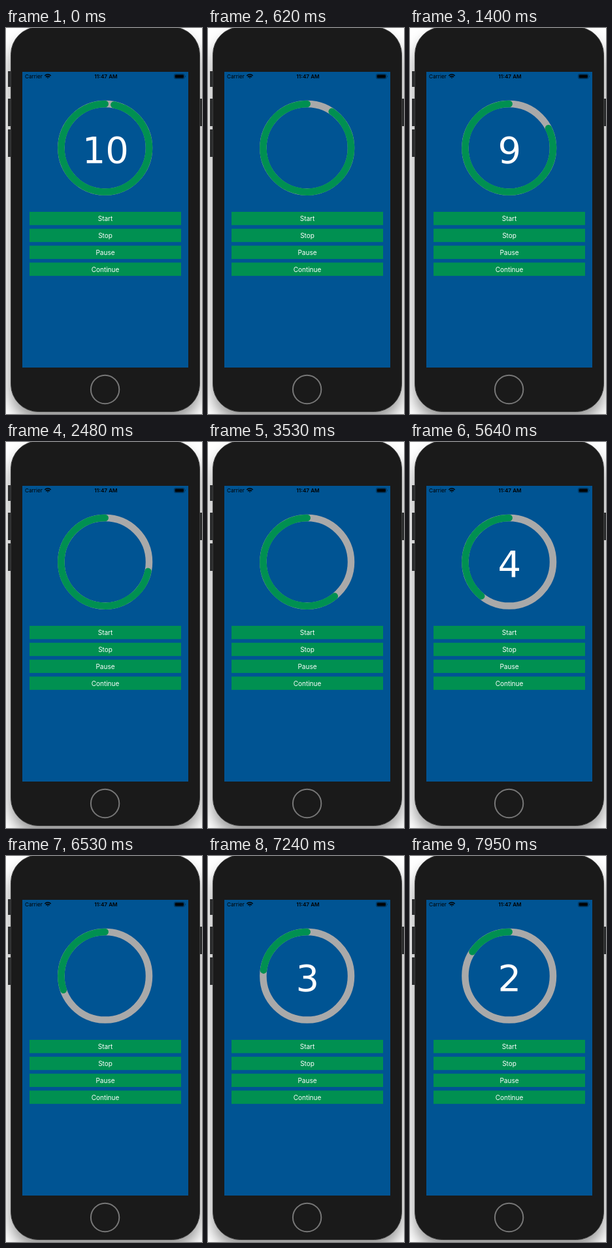
These frames come from a looping animation (300 by 590 pixels, 8 s). An HTML page:

```html
<!DOCTYPE html>
<html lang="en">
<head>
<meta charset="utf-8">
<title>Countdown</title>
<style>
html, body { margin: 0; width: 100%; height: 100%; overflow: hidden; background: #fff; }
svg { display: block; width: 300px; height: 590px; }
text { font-family: Inter, sans-serif; text-anchor: middle; }
#digits { font: 56px "DejaVu Sans", sans-serif; fill: #fff; }
.button rect { fill: #009051; }
.button text { font-size: 10px; fill: #fff; }
.status { font-size: 8.2px; }
</style>
</head>
<body>
<svg viewBox="0 0 300 590">
  <defs>
    <filter id="blur" x="-20%" y="-20%" width="140%" height="140%">
      <feGaussianBlur stdDeviation="11"/>
    </filter>
  </defs>

  <!-- phone -->
  <rect x="7" y="14" width="290" height="586" rx="44" opacity=".42" filter="url(#blur)"/>
  <path d="M3 66h6v24h-6zM3 108h6v42h-6zM3 155h6v42h-6zM295 108h5v42h-5z" fill="#2b2c2d"/>
  <rect x="7.5" y="-1.5" width="289" height="588" rx="42" fill="#1a1a1a" stroke="#3c3c3c"/>
  <circle cx="151.6" cy="552.5" r="21.7" fill="none" stroke="#777" stroke-width="2"/>
  <rect x="25" y="67" width="254" height="452" fill="#005493"/>

  <!-- status bar -->
  <g class="status">
    <text x="29" y="77" style="text-anchor:start">Carrier</text>
    <text x="153" y="77" font-weight="600">11:47 AM</text>
    <g fill="none" stroke="#000" stroke-width="1.4">
      <path d="M59.3 73a6.6 6.6 0 0 1 9.4 0M61 75a4.2 4.2 0 0 1 6 0"/>
      <path d="M62.6 75.6h2.8L64 77.2z" fill="#000" stroke="none"/>
      <rect x="257.5" y="70.5" width="15.5" height="7" rx="1.8" stroke="#032b4b" stroke-width=".8"/>
    </g>
    <rect x="258.6" y="71.5" width="13.3" height="5" rx="1"/>
    <path d="M274 72.6q1.6 1.4 0 2.8z" fill="#032b4b"/>
  </g>

  <!-- timer -->
  <g fill="none" stroke-width="10.5" stroke-linecap="round">
    <circle cx="151.7" cy="183.3" r="67.3" stroke="#a9a9a9"/>
    <path id="arc" stroke="#009051"/>
  </g>
  <text id="digits" x="152.3" y="205.6"></text>
  <g id="buttons"></g>
</svg>
<script>
const LOOP = 8000, STEP = 88.33;
const CX = 151.7, CY = 183.3, R = 67.3;
const arc = document.getElementById('arc');
const digits = document.getElementById('digits');

document.getElementById('buttons').innerHTML = ['Start', 'Stop', 'Pause', 'Continue']
  .map((label, i) => {
    const y = 281 + i * 25.85;
    return `<g class="button"><rect x="36" y="${y}" width="232" height="20.3"/>` +
      `<text x="152" y="${y + 14}">${label}</text></g>`;
  }).join('');

function render(time) {
  // The display refreshes in steps of 0.09 s of countdown time.
  const elapsed = 0.325 + 0.09 * Math.floor((time % LOOP + 14) / STEP);
  const angle = elapsed * Math.PI / 5;
  const x = CX + R * Math.sin(angle), y = CY - R * Math.cos(angle);
  arc.setAttribute('d', `M${x} ${y}A${R} ${R} 0 ${angle < Math.PI ? 1 : 0} 1 ${CX} ${CY - R}`);
  // Each number blanks out shortly before the next one.
  digits.textContent = elapsed % 1 < 0.8 ? 10 - Math.floor(elapsed) : '';
}

const start = performance.now();
function tick() {
  render(performance.now() - start);
  requestAnimationFrame(tick);
}
tick();
</script>
</body>
</html>
```
